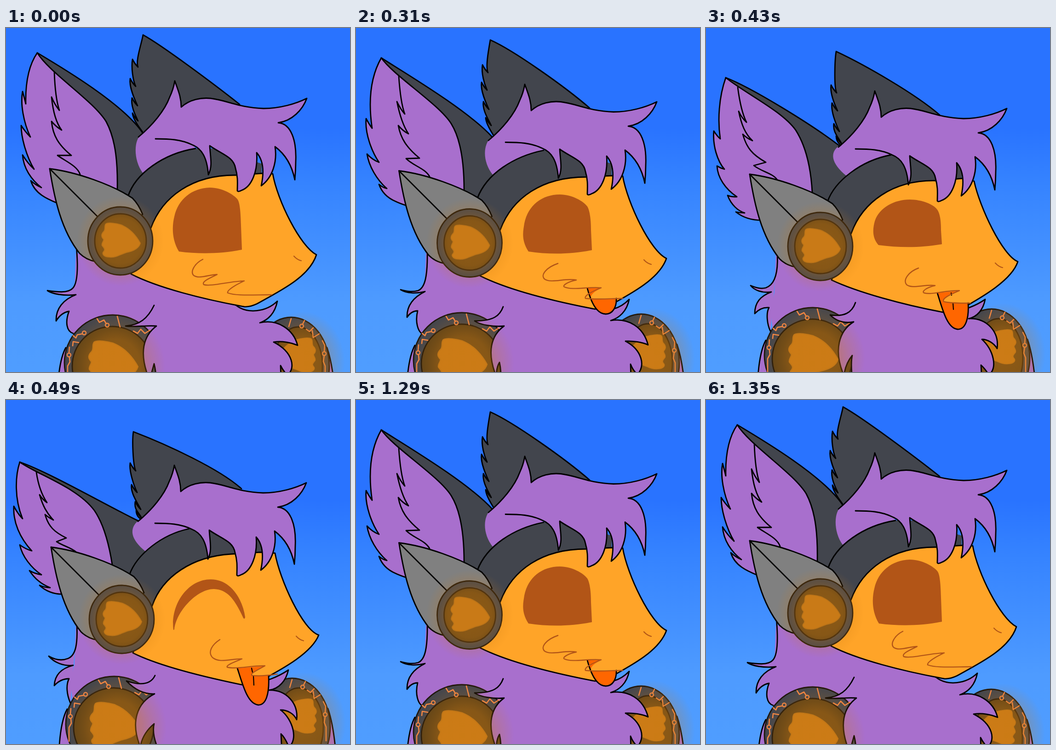
Write an HTML page that moves like this. It is 748x748 px and loops after 2410 ms.

```html
<!DOCTYPE html>
<html lang="en">
<head>
<meta charset="utf-8">
<title>Blep</title>
<style>
html, body { margin: 0; width: 100%; height: 100%; overflow: hidden; background: #2973ff; }
svg { display: block; width: 100%; height: 100%; }
</style>
</head>
<body>
<svg id="stage" viewBox="0 0 748 748" fill="none" stroke-width="2.8" stroke-linejoin="round" stroke-linecap="round">
  <defs>
    <linearGradient id="sky" x1="0" y1="0" x2="0" y2="1">
      <stop offset=".29" stop-color="#2973ff"/>
      <stop offset=".45" stop-color="#3583ff"/>
      <stop offset=".8" stop-color="#4e9bff"/>
      <stop offset="1" stop-color="#4f9dff"/>
    </linearGradient>
    <radialGradient id="glow">
      <stop offset="0" stop-color="#cf7c14" stop-opacity=".45"/>
      <stop offset=".5" stop-color="#cf7c14" stop-opacity=".38"/>
      <stop offset=".68" stop-color="#cf7c14" stop-opacity=".22"/>
      <stop offset="1" stop-color="#cf7c14" stop-opacity="0"/>
    </radialGradient>
  </defs>
  <rect width="748" height="748" fill="url(#sky)"/>
</svg>
<script>
const stage = document.getElementById('stage');
const PURPLE = '#a86fcd', DARK = '#42454d', RUST = '#b25517', RIM = '#20170c', WIRE = '#f28645';
const live = [];

// Each key pose has one value; half poses blend the numbers of their neighbours.
function poseValue(list, pose) {
  const i = Math.floor(pose), f = pose - i;
  if (!f) return list[i];
  const next = list[i + 1].match(/-?[\d.]+/g) || [];
  let n = 0;
  return list[i].replace(/-?[\d.]+/g, v => +v + (next[n++] - v) * f);
}

function add(parent, tag, attrs) {
  const el = document.createElementNS('http://www.w3.org/2000/svg', tag);
  for (const [name, value] of Object.entries(attrs)) {
    if (Array.isArray(value)) live.push({ el, name, value });
    else el.setAttribute(name, value);
  }
  return parent.appendChild(el);
}

const path = (d, fill = 'none', stroke = '#000', parent = stage, width = 2.8) =>
  add(parent, 'path', { d, fill, stroke, 'stroke-width': width });

// Filled shape whose outline covers only its first part.
function partOutlined(edges, rest, fill) {
  const tail = i => Array.isArray(rest) ? rest[i] : rest;
  path(edges.map((e, i) => e && e + tail(i)), fill, 'none');
  path(edges);
}

const ellipse = (parent, cx, cy, rx, ry, fill, stroke = 'none') =>
  add(parent, 'ellipse', { cx, cy, rx, ry, fill, stroke });

const moving = (...offsets) =>
  add(stage, 'g', { transform: offsets.map(([x, y]) => `translate(${x} ${y})`) });

const CORE = 'M217 426 C223 422 240 425 250 428 C270 436 284 453 292 468 C289 479 277 485 262 488 ' +
  'C249 492 238 500 225 498 C215 498 209 493 211 488 C217 482 214 479 209 473 C207 467 214 463 212 459 ' +
  'C206 453 207 448 213 442 C217 437 213 431 217 426Z';
const core = (parent, transform) =>
  add(parent, 'path', { d: CORE, transform, fill: '#c97a17', stroke: '#bc7418', 'stroke-width': 2 });

function wires(parent, d, nodes) {
  path(d, 'none', WIRE, parent, 2.6);
  for (const [cx, cy] of nodes)
    add(parent, 'circle', { cx, cy, r: 4, stroke: WIRE, 'stroke-width': 2.4 });
}

// Neck
path('M152 490 L149 575 L140 612 L146 664 L330 760 L560 640 L520 610 L270 530 L200 490Z', PURPLE, 'none');
path([
  'M153 475 C157 520 156 555 145 566 C135 577 110 574 90 571 C100 578 125 583 152 580 C125 590 108 610 109 637 C115 627 125 618 137 616 C128 640 132 660 146 664',
  'M155 483 C156 540 150 565 135 571 C120 575 108 572 97 569 C110 577 130 578 150 573 C130 583 110 600 111 629 C117 620 125 615 134 615 C128 640 135 660 144 665',
  'M155 492 C157 530 150 558 130 565 C118 568 107 564 97 560 C105 570 122 577 142 574 C118 583 106 597 106 621 C115 611 125 607 137 608 C130 620 133 645 140 659',
  'M154 488 C156 530 152 555 135 562 C120 568 105 564 93 557 C105 571 125 579 146 577 C122 583 106 597 105 621 C115 610 125 606 137 606 C130 620 132 640 140 659'
], PURPLE);

// Shoulders
const leftMove = [[0, 0], [-2, -5], [0, -16], [3, -23]];
const rightMove = [[0, 0], [0, -7], [1, -18], [2, -24]];

const left = moving(...leftMove);
path('M130 695 C119 715 114 745 112 790 L160 790', PURPLE, '#000', left);
ellipse(left, 232, 728, 105, 104, DARK, RIM);
ellipse(left, 231, 735, 87, 86, '#5a4018', RIM);
wires(left, 'M138 694 L137 706 M138 716 L139 726 L134 735 L134 765 M145 691 L146 682 L158 684 ' +
  'M146 669 L152 674 L155 667 L166 665 M198 632 L203 640 L213 635 L218 643 M242 627 L248 650 ' +
  'M277 659 L286 664 L293 655 L302 664 L313 657', [[137, 711], [170, 663], [220, 646]]);
core(left, 'translate(-84 142) scale(1.27)');

const right = moving(...rightMove);
path('M698 695 Q710 730 715 790 L680 790', PURPLE, '#000', right);
ellipse(right, 620, 735, 83, 106, DARK, RIM);
ellipse(right, 635, 735, 53, 85, '#5a4018', RIM);
wires(right, 'M620 632 L615 649 M649 636 L645 644 M653 655 L660 660 L668 652 ' +
  'M666 658 L668 673 L681 665 M688 680 L693 690 L692 704 M692 712 L690 725 L694 735 L694 765',
  [[643, 648], [692, 708]]);
core(right, 'translate(881 250) scale(-1 1)');
ellipse(right, 645, 728, 92, 112, 'url(#glow)');

// Chest
path([
  'M322 603 C308 632 290 646 260 648 C280 651 305 646 327 648 C300 668 287 705 312 765 Q318 745 322 730 Q326 745 327 770 L598 770 L597 734 Q603 746 612 755 C630 740 625 705 582 683 C600 680 620 684 634 690 C625 655 590 632 552 641 C570 635 585 620 590 594 C565 618 525 622 500 603',
  'M320 606 C313 625 300 637 258 637 C270 646 300 650 322 648 C294 668 283 705 306 760 Q304 740 312 727 Q316 745 315 770 L598 770 L597 731 Q603 746 612 753 C630 735 622 700 586 681 C602 680 622 683 635 689 C625 650 592 630 554 636 C572 631 589 616 594 590 C575 610 545 620 520 610',
  'M325 597 C317 620 300 628 270 624 C283 637 300 643 321 639 C290 658 276 700 300 756 Q303 730 318 712 Q314 730 319 770 L600 770 L598 733 Q606 740 615 754 C635 740 625 700 600 677 C612 677 626 685 633 697 C638 660 610 630 571 632 C590 628 603 612 607 590 C590 602 560 616 530 617',
  'M324 599 C315 618 295 622 262 611 C280 630 300 640 323 639 C285 658 270 700 292 754 Q297 725 322 704 Q316 730 336 770 L600 770 L598 726 Q606 733 615 754 C635 740 625 695 597 674 C612 674 626 682 632 695 C636 660 610 630 572 631 C594 628 609 610 614 587 C595 600 560 616 530 617'
], PURPLE);
ellipse(moving(...leftMove), 238, 735, 108, 116, 'url(#glow)');

// Far ear: outer curve, then upward tufts down its left side
function farEar(curve, tip, tufts, end) {
  let [px, py] = tip, d = `${curve} ${px} ${py}`;
  for (const [x, y] of tufts) {
    d += ` C${px - 3} ${py + 18} ${x + 6} ${y + 4} ${x + 12} ${y + 17} Q${x + 5} ${y + 10} ${x} ${y}`;
    [px, py] = [x, y];
  }
  return `${d} Q${px} ${py + 12} ${end}`;
}
path([
  farEar('M508 166 C455 124 340 38', [298, 15], [[275, 68], [270, 110], [274, 152], [275, 185]], '297 226'),
  farEar('M508 174 C455 128 342 48', [292, 26], [[275, 80], [273, 118], [277, 160], [282, 195]], '300 235'),
  farEar('M508 189 C455 143 345 80', [283, 51], [[272, 124], [274, 163], [278, 208], [283, 235]], '294 256'),
  farEar('M512 193 C465 150 350 97', [277, 69], [[270, 137], [273, 184], [281, 221], [283, 240]], '293 259')
], DARK);

// Near ear
partOutlined([
  'M68 54 C120 85 255 165 297 228',
  'M55 65 C110 100 245 180 297 238',
  'M43 108 C100 130 230 210 290 256',
  'M30 135 C90 155 220 230 288 263'
], 'L320 300 L270 385 L235 380Z', DARK);
path([
  'M242 353 C243 300 240 245 218 204 C190 158 95 98 68 54 C50 80 42 120 43 165 Q40 152 36 138 C31 165 38 205 53 237 Q42 226 33 212 C33 240 45 280 61 307 Q47 294 36 276 C38 305 55 330 77 347 Q65 342 54 332 C62 360 90 372 112 381',
  'M235 352 C235 300 230 245 207 208 C180 165 82 104 55 65 C35 100 25 150 35 218 Q29 210 22 197 C19 230 35 270 50 292 Q36 287 24 274 C28 300 45 330 67 349 Q58 347 50 340 C57 360 72 371 86 377 Q86 377 86 377 C94 381 103 384 112 387',
  'M231 357 C228 305 218 258 195 222 C165 180 85 142 43 108 C28 150 25 200 31 241 Q24 235 17 224 C14 255 25 290 40 307 Q32 305 24 300 C25 325 42 350 67 367 Q56 368 47 364 C55 385 70 398 84 402 Q74 402 65 400 C80 412 100 418 121 418',
  'M231 358 C225 320 214 272 192 240 C155 190 70 163 30 135 C20 165 18 215 36 258 Q26 248 17 231 C15 265 30 300 56 328 Q42 324 30 315 C35 340 55 365 77 380 Q63 378 51 371 C60 385 75 400 96 408 Q84 408 73 403 C85 415 105 423 123 422'
], PURPLE);
path([
  'M105 95 C106 125 108 155 116 179 Q106 167 99 150 C102 180 108 205 121 222 Q109 215 99 203 C102 235 115 255 142 277 L112 277 C130 290 155 300 161 318',
  'M93 105 C95 135 98 165 106 187 Q97 177 89 160 C95 190 102 212 114 230 Q102 224 92 212 C97 240 110 260 138 283 L109 284 C125 300 150 305 160 323',
  'M69 129 C73 160 78 185 88 205 Q78 196 71 181 C77 210 85 230 101 245 Q89 240 80 231 C88 260 100 275 130 292 L104 299 C120 312 145 316 154 329',
  'M66 157 C70 185 77 205 89 223 Q80 217 73 206 C80 230 88 245 103 261 Q93 256 85 249 C92 275 105 287 131 300 L110 308 C125 318 140 320 153 331'
]);

// Hair behind the band
path([
  'M290 236 C278 250 278 290 298 316 L412 262 L400 240Z',
  'M289 243 C275 262 278 296 298 320 L408 268 L400 247Z',
  'M290 256 C268 270 272 295 306 322 L402 278 L400 262Z',
  'M288 262 C266 280 272 304 303 329 L398 282 L395 268Z'
], PURPLE, 'none');

// Band and face
partOutlined([
  'M265 367 C281 316 343 273 412 262',
  'M264 370 C284 317 343 279 408 266',
  'M264 378 C280 332 338 288 402 276',
  'M268 381 C284 335 340 292 398 280'
], 'L450 262 L556 295 L556 340 L400 370 L316 450 L290 430Z', DARK);
path([
  'M272 535 L315 435 C340 367 405 319 500 320 L558 316 L580 317 C590 375 640 475 675 493 C660 540 600 570 545 600 Q530 607 518 606 C430 590 330 565 272 535Z',
  'M270 539 L314 438 C340 369 405 324 500 324 L558 321 L580 322 C590 380 640 485 675 501 C660 545 600 577 545 607 Q530 612 518 611 C430 594 330 569 270 539Z',
  'M273 548 L316 446 C340 380 405 330 500 332 L558 327 L583 333 C595 390 645 495 678 508 C665 548 600 585 565 605 Q540 620 515 618 C430 602 330 575 273 548Z',
  'M276 550 L318 447 C340 384 405 340 490 335 L553 331 L585 333 C595 390 645 500 680 511 C665 550 600 585 565 604 Q540 620 512 619 C430 602 330 577 276 550Z'
], '#ffa428');
path([
  'M376 486 C360 460 361 430 366 410 C374 372 405 348 443 347 C470 347 495 362 503 372 C508 378 510 395 511 430 L513 482 C470 491 420 492 376 486Z',
  'M375 486 C358 460 364 440 366 425 C374 385 405 362 443 362 C470 362 495 377 503 388 C509 398 511 420 511 440 L513 483 C470 492 420 493 375 486Z',
  'M375 472 C360 455 363 435 367 420 C377 390 410 373 443 373 C470 373 495 384 502 394 C509 402 511 420 511 440 L513 470 C470 478 420 478 375 472Z',
  'M364 500 C357 445 395 390 445 390 C490 390 515 435 520 472 Q519 478 516 474 C500 440 485 412 452 411 C415 411 370 460 366 499Z'
], RUST, 'none');
path('M626 496 Q633 504 642 506', 'none', RUST, moving([0, 0], [0, 8], [3, 15], [5, 17.5]), 2.2);

// Tongue and mouth
partOutlined([
  '',
  'M566 588 C567 607 558 622 543 622 C525 622 512 600 503 566',
  'M570 598 C572 630 565 656 547 655 C525 653 515 615 503 576',
  'M571 600 C573 640 565 664 548 663 C525 660 515 620 503 583'
], [
  '',
  'L532 566 C520 572 509 580 511 588Z',
  'L551 572 C532 580 516 588 517 595Z',
  'L563 579 C545 588 532 595 535 599Z'
], '#ff6600');
path(['', '', 'M533 576 L534 581 M537 598 L538 612', 'M534 583 L536 592 M538 600 L539 620'], 'none', '#000', stage, 2.2);
path([
  'M428 503 C410 512 400 530 408 538 C420 547 445 535 459 536 C440 545 425 552 430 558 C445 563 490 550 518 550 C500 558 480 570 482 576 C500 583 540 580 578 580',
  'M439 512 C415 520 400 537 410 546 C425 556 455 543 479 548 C460 552 448 560 453 563 C470 571 505 562 533 565 C515 572 495 582 499 588 C530 591 555 588 580 588',
  'M462 522 C440 530 428 548 436 558 C448 568 475 557 498 560 C480 564 468 573 474 576 C490 581 520 570 551 571 C530 580 512 588 517 595 C540 600 560 598 575 598',
  'M465 521 C448 532 438 548 449 560 C465 573 490 562 513 563 C495 570 478 577 481 581 C500 586 535 577 563 578 C545 588 530 595 535 599 C550 601 570 599 590 596'
], 'none', RUST, stage, 2.4);

// Fringe
path('M288 237 C318 212 345 180 356 150 Q364 133 367 115 C374 135 381 150 381 172 C400 155 425 151 445 153 ' +
  'C480 157 505 173 560 175 C595 175 630 165 654 153 C645 178 622 202 592 206 C620 208 632 245 630 290 ' +
  'Q630 310 628 330 C622 300 608 275 585 258 C590 290 580 325 555 343 C560 320 562 290 545 271 ' +
  'C548 310 535 345 512 353 Q505 357 503 354 C503 340 505 325 499 305 C495 280 470 275 443 256 ' +
  'C444 280 450 300 440 319 C437 280 425 262 405 254 C380 242 355 241 325 241',
  PURPLE, '#000', moving([0, 0], [0, 7.5], [0, 22], [-1, 27]));

// Side fin and earpiece
const side = moving([0, 0], [-1.5, 4.5], [0, 12], [3, 14]);
path('M297 405 C291 390 285 380 275 370 C232 341 153 313 95 306 C105 370 120 440 160 490 C170 500 180 505 195 508Z', '#808080', '#000', side);
path('M95 306 L200 411', 'none', '#000', side);
ellipse(side, 248.5, 463, 70.5, 74, DARK, RIM);
ellipse(side, 249, 463, 56, 59, '#5a4018', RIM);
ellipse(side, 249, 463, 95, 98, 'url(#glow)');
core(side, '');

const LOOP = 2410;
const ends = [310, 370, 430, 490, 1170, 1230, 1290, 1350, LOOP];
const poses = [0, 1, 1.5, 2, 3, 2, 1.5, 1, 0];
const start = performance.now();
let shown = -1;

function draw() {
  const t = Math.max(0, performance.now() - start) % LOOP;
  const pose = poses[ends.findIndex(end => t < end)];
  if (pose !== shown) {
    for (const { el, name, value } of live) el.setAttribute(name, poseValue(value, pose));
    shown = pose;
  }
  requestAnimationFrame(draw);
}
draw();
</script>
</body>
</html>
```
